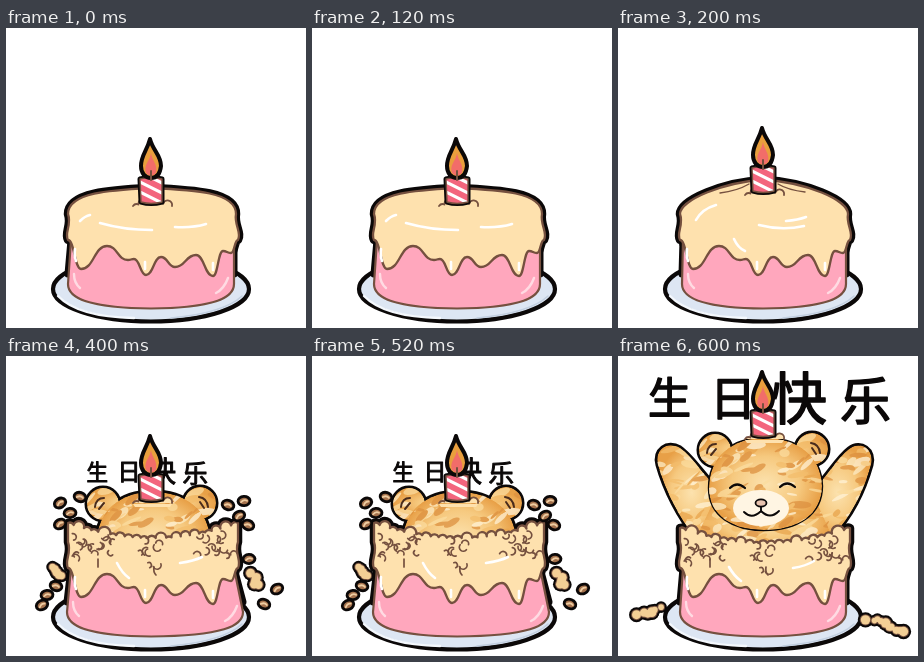
An HTML page that plays this animation: 300x300 px, repeating every 0.8 s.

```html
<!DOCTYPE html>
<html lang="zh">
<head>
<meta charset="utf-8">
<title>生日快乐</title>
<style>
html, body { margin: 0; width: 100%; height: 100%; overflow: hidden; background: #fff; }
svg { display: block; width: 100vw; height: 100vh; }
text { font-family: "Noto Sans CJK SC", "Noto Sans CJK", sans-serif; font-weight: 500; }
</style>
</head>
<body>
<svg id="stage" viewBox="0 0 300 300" stroke-linecap="round" stroke-linejoin="round"></svg>
<script>
const CREAM = '#fee1ae', PINK = '#ffa7bd', BROWN = '#75503f', INK = '#0b0808';
const LEFT = 62, RIGHT = 232, EDGE = 212, STEP = 200;

// turning points of the icing edge
const DRIP = [[62, 212], [75, 241], [101, 218], [122, 232], [128, 231], [140, 247], [155, 229],
  [169, 239], [190, 227], [207, 248], [217, 223], [225, 225], [232, 212]];

function seeded(s) {
  return () => (s = (s * 16807) % 2147483647) / 2147483647;
}

const path = (d, fill, stroke = 'none', w = 0) =>
  `<path d="${d}" fill="${fill}" stroke="${stroke}" stroke-width="${w}"/>`;
const line = (d, stroke, w) => path(d, 'none', stroke, w);
const oval = (x, y, rx, ry, fill, stroke = 'none', w = 0, turn = 0) =>
  `<ellipse cx="${x}" cy="${y}" rx="${rx}" ry="${ry}" fill="${fill}" stroke="${stroke}" stroke-width="${w}" transform="rotate(${turn} ${x} ${y})"/>`;
const clip = (id, d, body) =>
  `<clipPath id="${id}">${path(d, '#000')}</clipPath><g clip-path="url(#${id})">${body}</g>`;
const shine = d => line(d, '#fff', 2.6);

// row of uneven bumps along y = height(u), u from -1 to 1
function bumps(x0, x1, n, height, seed) {
  const rnd = seeded(seed);
  let d = `L${x0},${height(-1)}`;
  for (let i = 1; i <= n; i++) {
    const u = (i + (i < n ? (rnd() - 0.5) * 0.6 : 0)) / n * 2 - 1;
    const r = (x1 - x0) / n * 0.56;
    d += `A${r},${r} 0 0 1 ${x0 + (u + 1) / 2 * (x1 - x0)},${height(u)}`;
  }
  return d;
}

// merged round crumbs between two places
function clump(x0, y0, x1, y1, n, seed) {
  const rnd = seeded(seed), dots = [];
  for (let i = 0; i < n; i++) {
    const k = i / (n - 1);
    dots.push([x0 + (x1 - x0) * k + rnd() * 5 - 2.5, y0 + (y1 - y0) * k + rnd() * 5 - 2.5, 2.6 + rnd() * 2.2]);
  }
  const layer = (grow, fill) => dots.map(([x, y, r]) => oval(x, y, r + grow, r + grow, fill)).join('');
  return layer(3, INK) + layer(1, BROWN) + layer(0, '#f3cf95');
}

function curls(x, y, rx, ry, n, seed) {
  const rnd = seeded(seed);
  let out = '';
  for (let i = 0; i < n; i++) {
    const px = x + (rnd() * 2 - 1) * rx, py = y + (rnd() * 2 - 1) * ry, r = 2.6 + rnd() * 1.6;
    out += `<g transform="rotate(${rnd() * 360} ${px} ${py})">${line(`M${px - r},${py}a${r},${r} 0 0 1 ${r * 2},0`, BROWN, 1.7)}</g>`;
  }
  return out;
}

function plate() {
  return oval(145, 261, 98, 32.5, '#dde6f3', INK, 4.2) +
    line('M52,268Q72,289 128,290', '#f4f8fd', 2.4) + line('M165,290Q218,285 236,268', '#c2cfe0', 1.6);
}

function candle(y, id) {
  const x = 145;
  const body = `M${x - 11},${y + 1}Q${x},${y - 2} ${x + 11},${y + 1}V${y + 24}Q${x},${y + 27} ${x - 10},${y + 24}Z`;
  const stripes = [-18, -8, 2, 12].map(k => line(`M${x - 15},${y + k}l30,15`, '#fff', 3.2)).join('');
  return path(body, INK, INK, 5) +
    clip('wax' + id, body, path(body, '#f3657d') + stripes) + line(body, BROWN, 1.4) +
    path(`M${x - 1},${y - 39}C${x + 2},${y - 27} ${x + 10},${y - 23} ${x + 10},${y - 12}C${x + 9},${y - 3} ${x + 5},${y} ${x},${y}C${x - 6},${y} ${x - 10},${y - 5} ${x - 10},${y - 12}C${x - 10},${y - 23} ${x - 4},${y - 27} ${x - 1},${y - 39}Z`, '#e99f3d', INK, 4) +
    path(`M${x},${y - 25}C${x + 1},${y - 17} ${x + 7},${y - 14} ${x + 5},${y - 5}Q${x},${y} ${x - 5},${y - 5}C${x - 8},${y - 13} ${x - 1},${y - 17} ${x},${y - 25}Z`, '#f26d69') +
    line(`M${x},${y - 7}v9`, BROWN, 2);
}

const mound = y => path(`M127,${y}${bumps(127, 166, 5, u => y - 3 * (1 - u * u), 5)}`, CREAM, BROWN, 1.8) +
  path(`M127,${y + 1}h39l-2,3h-35Z`, CREAM);

function cake(top, foot) {
  const edge = [...DRIP].reverse();
  let drip = '';
  for (let i = 1; i < edge.length; i++) {
    const [x0, y0] = edge[i - 1], [x1, y1] = edge[i], mid = (x0 + x1) / 2;
    drip += `C${mid},${y0} ${mid},${y1} ${x1},${y1}`;
  }
  const lid = `M${LEFT},${EDGE}C${LEFT - 4},205 ${LEFT + 4},197 ${LEFT},186${top}` +
    `C${RIGHT - 4},197 ${RIGHT + 4},205 ${RIGHT},${EDGE}${drip}Z`;
  const [l, r] = foot;
  const sponge = `M${LEFT + 3},${EDGE}L${l},256C${l},270 ${l + 20},280 145,280.5C${r - 20},280 ${r},270 ${r},256L${RIGHT - 4},${EDGE}Z`;
  return {
    back: path(`M${LEFT + 3},${EDGE}L${l},246H${r}L${RIGHT - 4},${EDGE}Z`, INK, INK, 7) + path(lid, CREAM, INK, 8.5),
    front: path(sponge, PINK, BROWN, 2.2) + path(lid, CREAM, BROWN, 2.3) +
      line(`M${l + 6},246q0,9 6,14M${r - 6},250q-4,11 -12,15`, '#ffdbe3', 2.4) +
      shine('M139,234v7M207,235v7M69,221q-1,7 1,12')
  };
}

// whole top: a dome rising to the candle
const dome = (peak, shoulder) =>
  `C${LEFT},${shoulder} 106,${peak + 2} 145,${peak}C188,${peak + 2} ${RIGHT - 2},${shoulder} ${RIGHT - 2},186`;
// broken top: a crumbly rim, lowest in front
const rim = (low, seed) => bumps(LEFT, RIGHT, 21, u => low - 15 * u * u, seed) + `L${RIGHT},186`;

function crumble(low) {
  return curls(88, low + 9, 21, 12, 15, 31) + curls(146, low + 15, 12, 13, 8, 57) +
    curls(210, low + 8, 19, 11, 13, 83) + line('M92,203v8M148,211q-1,5 2,8', BROWN, 1.7);
}

function fur(id, d, x, y, w, h, seed) {
  const rnd = seeded(seed), tones = ['#fdebc4', '#fbdc9f', '#e9a44c', '#fff2d6', '#f3bd6b', '#dd9140'];
  let spots = '';
  for (let i = 0; i < w * h / 110; i++) {
    const tone = tones[Math.floor(rnd() * tones.length)];
    spots += oval(x + rnd() * w, y + rnd() * h, 4 + rnd() * 8, 1 + rnd() * 3, tone, 'none', 0, rnd() * 70 - 50);
  }
  return clip(id, d, path(d, 'url(#coat)') + `<g opacity=".75">${spots}</g>`);
}

function bear(id, dy, arms) {
  const disc = (x, y, r) => `M${x - r},${y}a${r},${r} 0 1 1 ${2 * r},0a${r},${r} 0 1 1 ${-2 * r},0Z`;
  const ears = disc(97, 94, 16) + disc(194, 93, 16);
  const head = 'M91,132C91,101 114,82 146,82C180,82 203,100 204,130C204,159 179,174 146,174C115,174 91,160 91,132Z';
  const arm = 'M40,109C36,94 49,84 62,92C75,101 87,121 100,133L108,184L78,182C61,162 47,134 40,109Z';
  const other = 'M253,109C257,94 243,84 231,93C219,102 209,121 195,134L186,184L214,180C233,162 246,134 253,109Z';
  const body = 'M78,182L98,140H196L214,180L190,194H100Z';
  const limbs = arms ? path(arm + other + body, INK, INK, 5) +
    fur('arm' + id, arm, 38, 88, 70, 96, 19) + fur('other' + id, other, 186, 88, 70, 96, 41) +
    fur('body' + id, body, 78, 140, 136, 54, 67) : '';
  return `<g transform="translate(0 ${dy})">` + limbs +
    path(ears, INK, INK, 5) + path(head, INK, INK, arms ? 2.4 : 5) +
    fur('ears' + id, ears, 80, 76, 132, 34, 23) + fur('head' + id, head, 91, 82, 114, 92, 97) +
    line('M89,97q1,-9 9,-9M93,99l5,-6M202,97q-1,-9 -9,-10M198,98l-4,-6', '#4a2c1c', 2) +
    oval(143, 152, 28, 18, '#fff5e3') +
    oval(143, 147, 5.5, 3.6, '#e9c3ae', INK, 1.8) +
    line('M143,151v4M143,155q-9,9 -17,1M143,155q9,9 18,0', INK, 1.9) +
    line('M112,132q7,-7 15,0M162,131q7,-7 15,0', INK, 2.2) + '</g>';
}

function bean(x, y, turn) {
  return `<g transform="translate(${x} ${y}) rotate(${turn})">` +
    oval(0, 0, 6, 4.6, '#a4714c', INK, 2.8) + line('M-3,1Q0,-2 3,0', '#efcda2', 1.8) + '</g>';
}

function beans() {
  const places = [[54, 147], [74, 141], [64, 157], [54, 168], [50, 230], [41, 239], [36, 249],
    [222, 149], [238, 145], [233, 160], [242, 169], [243, 203], [271, 233], [258, 248]];
  return places.map(([x, y], i) => bean(x, y, i * 47 % 70 - 30)).join('') +
    clump(49, 209, 54, 221, 5, 7) + clump(247, 216, 251, 229, 5, 13);
}

function greeting(x, y, scale, weight) {
  const glyphs = [['生', 30, 58, 43], ['日', 92, 59, 46], ['快', 153, 63, 56], ['乐', 222, 64, 51]];
  return `<g transform="translate(${x} ${y}) scale(${scale})" fill="${INK}" stroke="${INK}" stroke-width="${weight}">` +
    glyphs.map(([ch, gx, gy, size]) => `<text x="${gx}" y="${gy}" font-size="${size}">${ch}</text>`).join('') + '</g>';
}

function scene({ top, foot, wick, behind = '', inside = '', over = '' }, id) {
  const c = cake(top, foot);
  return plate() + behind + c.back + inside + c.front + mound(wick + 28) + candle(wick, id) + over;
}

const scenes = [
  { top: dome(160, 164), foot: [62, 228], wick: 150,
    over: shine('M94,195Q118,202 146,202M169,199Q187,200 200,196M74,193q5,-5 10,-6') },
  { top: dome(152, 172), foot: [64, 228], wick: 139,
    over: line('M102,165Q119,163 131,156M160,156Q170,162 187,164', BROWN, 1.4) +
      shine('M78,192Q84,181 98,177M141,197Q164,203 186,198M168,193Q180,192 188,189M116,211q4,9 11,12') },
  { top: rim(182, 11), foot: [61, 237], wick: 119,
    behind: greeting(65.5, 94.5, 0.5, 2), inside: bear('low', 54, false),
    over: crumble(182) + beans() + shine('M111,207q5,10 12,15M174,207q14,-2 22,-6') },
  { top: rim(187, 29), foot: [62, 228], wick: 55,
    behind: greeting(0, 0, 1, 1.5), inside: bear('high', 0, true),
    over: crumble(187) + clump(21, 260, 43, 253, 7, 17) + clump(250, 262, 287, 276, 10, 37) +
      shine('M111,211q5,9 12,14M175,212q13,-2 21,-7') }
];

const stage = document.getElementById('stage');
stage.innerHTML = '<radialGradient id="coat"><stop offset="0" stop-color="#fce2ae"/>' +
  '<stop offset=".6" stop-color="#f6c97f"/><stop offset="1" stop-color="#e8a047"/></radialGradient>' +
  scenes.map((s, i) => `<g class="pose">${scene(s, i)}</g>`).join('');

document.querySelectorAll('.pose').forEach((pose, i, all) => {
  const steps = [];
  for (let k = 0; k <= all.length; k++) {
    steps.push({ opacity: k % all.length === i ? 1 : 0, offset: k / all.length, easing: 'step-end' });
  }
  pose.animate(steps, { duration: STEP * all.length, iterations: Infinity });
});
</script>
</body>
</html>
```
